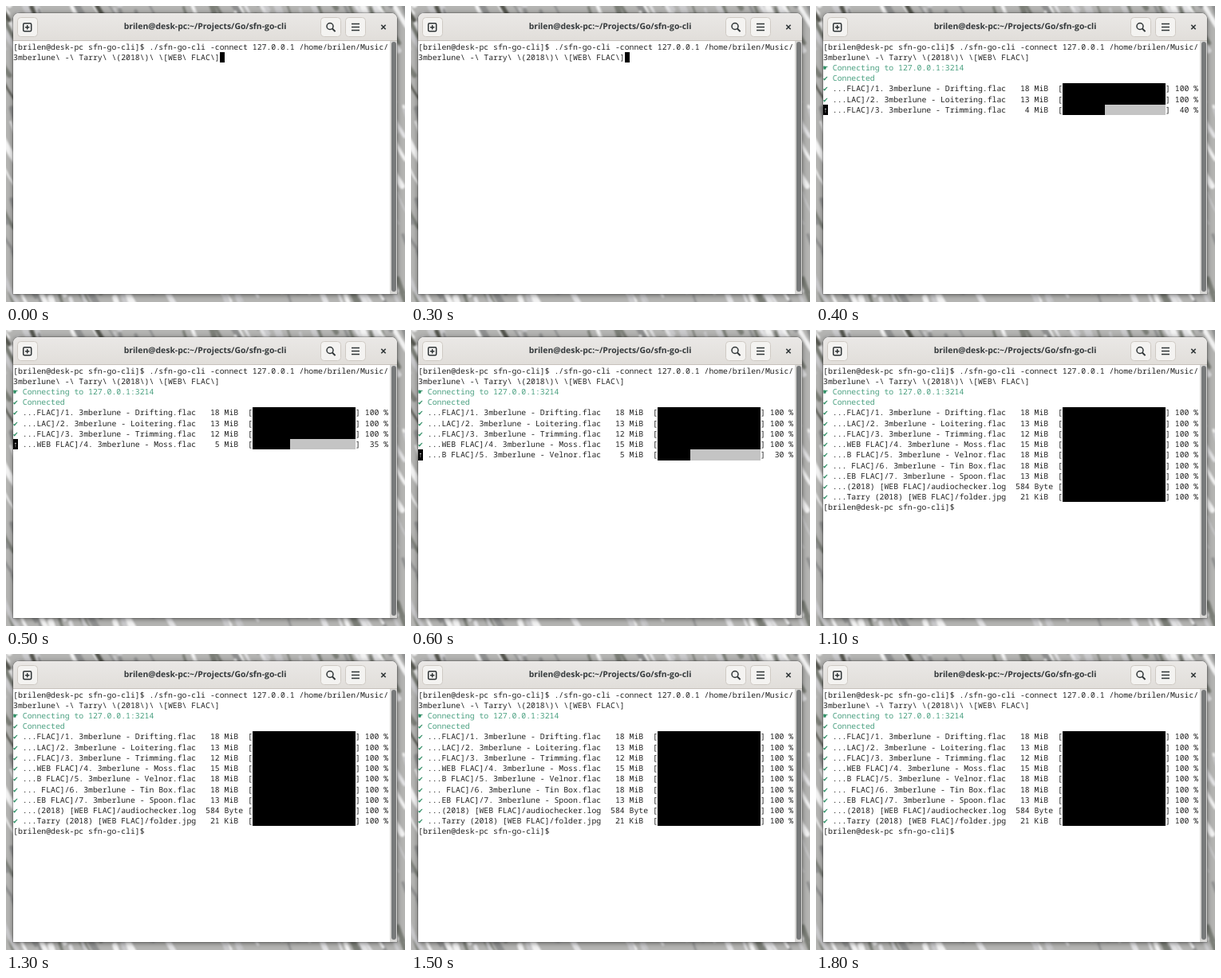
These frames come from a looping animation (500 by 372 pixels, 2120 ms). An HTML page:

```html
<!DOCTYPE html>
<html lang="en">
<head>
<meta charset="utf-8">
<title>Terminal upload</title>
<style>
  html, body { margin: 0; width: 100%; height: 100%; overflow: hidden; background: #b4b4b2; }
  svg, .window, pre, h1 { position: absolute; margin: 0; }
  svg { left: 0; top: 0; width: 500px; height: 372px; }
  .window {
    left: 9px; top: 9px; width: 481px; height: 353px; overflow: hidden;
    background: #fff; border-radius: 7px 7px 0 0;
  }
  .shadow { box-shadow: 0 1px 6px rgba(0, 0, 0, .5), 0 0 0 .5px rgba(0, 0, 0, .35); }
  .bar { height: 34px; background: linear-gradient(#eae8e6, #e1deda); border-bottom: 1px solid #c6c1bb; }
  .scroll { position: absolute; right: 0; top: 35px; width: 9px; bottom: 0; background: #d8d7d5; }
  .scroll i { position: absolute; left: 1.5px; top: 1px; width: 6px; bottom: 3px; border-radius: 3px; background: #77797a; }
  h1 {
    left: 0; top: 17px; width: 499px; text-align: center; white-space: pre; color: #34393b;
    font: bold 10.4px/19px "Open Sans", "Noto Sans", sans-serif; text-rendering: geometricPrecision;
  }
  pre {
    left: 9px; top: 44.6px; color: #222;
    font: 9.8px/13.23px "Noto Sans Mono", "DejaVu Sans Mono", monospace;
    text-rendering: geometricPrecision; font-variant-ligatures: none;
  }
  pre div { position: relative; height: 13.23px; white-space: pre; }
  pre b, pre i { position: absolute; left: 0; top: 0; height: 13.23px; font-weight: normal; font-style: normal; }
  .green { color: #4aa080; }
  pre .green b, pre b.green { color: #2c8c62; }
  .cursor { width: .6em; background: #000; color: #fff; }
</style>
</head>
<body>
<svg viewBox="0 0 500 372"><g id="leaves" style="filter: blur(.9px)" stroke-linecap="round"></g></svg>
<div class="window shadow">
  <div class="bar"></div>
  <div class="scroll"><i></i></div>
</div>
<svg viewBox="0 0 500 372" fill="none" stroke="#2e3436" stroke-width="1.5">
  <g fill="#f4f3f1" stroke="#cfcac4" stroke-width="1">
    <rect x="14.5" y="14.5" width="25" height="24" rx="4"/>
    <rect x="394.5" y="14.5" width="25" height="24" rx="4"/>
    <rect x="425.5" y="14.5" width="25" height="24" rx="4"/>
  </g>
  <rect x="21.7" y="21.7" width="10" height="10" rx="1.5"/>
  <path d="M26.7 24v5.4M24 26.7h5.4"/>
  <circle cx="406" cy="25.5" r="4"/>
  <path d="M409 28.5l3.6 3.6" stroke-width="2"/>
  <path d="M433 22.5h10M433 26.5h10M433 30.5h10" stroke-width="1.7"/>
  <path d="M470.3 23.8l5.4 5.4M475.7 23.8l-5.4 5.4" stroke-width="1.6"/>
</svg>
<h1>brilen@desk-pc:~/Projects/Go/sfn-go-cli</h1>
<pre id="term"></pre>
<script>
const LOOP = 2120, BAR = 22;
const PROMPT = "[brilen@desk-pc sfn-go-cli]$";
const DIR = "3mberlune - Tarry (2018) [WEB FLAC]/";
const tracks = ["Drifting", "Loitering", "Trimming", "Moss", "Velnor", "Tin Box", "Spoon"];
const sizes = [18, 13, 12, 15, 18, 18, 13];
const files = tracks.map((name, i) => [`${i + 1}. 3mberlune - ${name}.flac`, sizes[i], "MiB"]);
files.push(["audiochecker.log", 584, "Byte"], ["folder.jpg", 21, "KiB"]);

// [start ms, files sent]
const steps = [[400, 2.4], [500, 3.35], [600, 4.3], [700, 5.21], [1100, files.length]];

const row = (html, cls = "") => `<div class="${cls}">${html}</div>`;
const mark = (sign, cls) => `<b class="${cls}">${sign}</b>`;
const block = (col, width, color) =>
  `<i style="left:${col * .6}em;width:${width * .6}em;background:${color}"></i>`;

function fileRow([name, size, unit], part) {
  const percent = Math.round(part * 100);
  const filled = Math.round(part * BAR);
  const amount = String(Math.floor(size * part)).padStart(5);
  const text = "  ..." + (DIR + name).slice(-34) + amount + " " + unit.padEnd(5) +
    "[" + " ".repeat(BAR) + "] " + String(percent).padStart(3) + " %";
  return row(text + (part < 1 ? mark("↑", "cursor") : mark("✔", "green")) +
    block(51, filled, "#000") + block(51 + filled, BAR - filled, "#c4c4c4"));
}

function screen(t) {
  const step = steps.filter(s => s[0] <= t).pop();
  const rows = [
    row(PROMPT + " ./sfn-go-cli -connect 127.0.0.1 /home/brilen/Music/"),
    row("3mberlune\\ -\\ Tarry\\ \\(2018\\)\\ \\[WEB\\ FLAC\\]" + (step ? "" : block(44, 1, "#000")))
  ];
  if (!step) return rows.join("");
  const sent = step[1];
  rows.push(row("  Connecting to 127.0.0.1:3214" + mark("☛", ""), "green"));
  rows.push(row("  Connected" + mark("✔", ""), "green"));
  files.forEach((file, i) => {
    if (i < sent) rows.push(fileRow(file, Math.min(1, sent - i)));
  });
  if (sent === files.length) rows.push(row(PROMPT));
  return rows.join("");
}

// Blurred leaf streaks behind the window
function drawLeaves() {
  let seed = 11;
  const rand = () => (seed = seed * 16807 % 2147483647) / 2147483647;
  const tones = ["#55564f", "#7c7f78", "#8f9090", "#c9c9cb", "#f2f2f2", "#e2e2e4"];
  let out = "";
  for (let i = 0; i < 420; i++) {
    const x = rand() * 540 - 40, y = rand() * 420 - 50;
    const light = Math.min(1, (x + y) / 900 + .2);
    const tone = tones[Math.min(5, Math.floor(6 * (rand() * .75 + light * .3)))];
    const length = 25 + rand() * 40;
    out += `<path d="M${x} ${y}q${length * .15} ${length * .5} ${length * .5} ${length}"
      fill="none" stroke="${tone}" stroke-width="${2 + rand() * 6}"/>`;
  }
  document.getElementById("leaves").innerHTML = out;
}

const term = document.getElementById("term");
let shown = "";
function frame() {
  const html = screen(performance.now() % LOOP);
  if (html !== shown) term.innerHTML = shown = html;
  requestAnimationFrame(frame);
}
drawLeaves();
frame();
</script>
</body>
</html>
```
